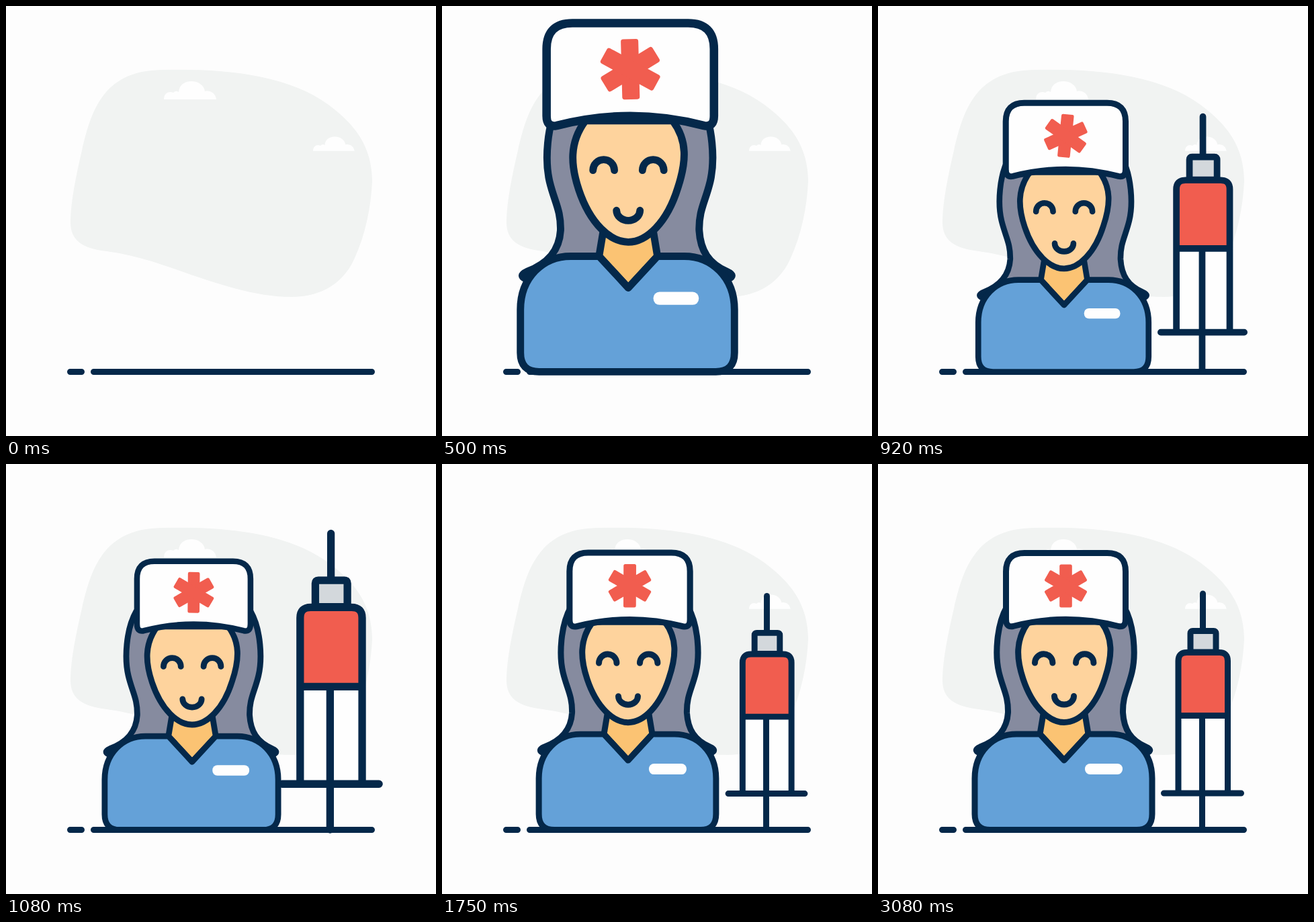
An HTML page for the animation above (3160 ms loop, 640 by 640 pixels).

```html
<!DOCTYPE html>
<html lang="en">
<head>
<meta charset="utf-8">
<title>Nurse and syringe</title>
<style>
  html, body { margin: 0; width: 100%; height: 100%; overflow: hidden; background: #fdfdfd; }
  svg { display: block; width: 100%; height: 100%; }
  .ink { stroke: #04284a; stroke-width: 9; stroke-linecap: round; stroke-linejoin: round; }
</style>
</head>
<body>
<svg viewBox="0 0 640 640">
  <defs>
    <path id="cloud" d="M0 27C0 17 8 14 14 17Q18 13 22 16C23 5 31 0 41 0C51 0 60 6 61 15C69 13 77 18 78 27Z"/>
    <rect id="bar" x="-9.3" y="-32" width="18.6" height="64" rx="2.5"/>
  </defs>

  <path fill="#f1f3f2" d="M96 322C96 290 106 245 113 215C128 150 148 95 235 95C330 93 420 103 480 147C525 180 545 215 545 262C543 300 535 340 519 375C503 412 470 433 425 433C370 433 310 412 250 391C215 379 190 371 150 365C115 361 96 350 96 322Z"/>
  <g fill="#fefefe">
    <use href="#cloud" x="235" y="112"/>
    <use href="#cloud" transform="translate(457 194.5) scale(.79)"/>
  </g>
  <path class="ink" fill="none" d="M95.5 544.5H112.5M130.5 544.5H544.5"/>

  <g id="syringe" class="ink" fill="none">
    <path d="M483.5 193V246"/>
    <path fill="#d3d8dc" d="M465 280V252Q465 248.5 468.5 248.5H499.5Q503 248.5 503 252V280Z"/>
    <path fill="#fefefe" stroke="none" d="M447 374H520.5V490H447Z"/>
    <path fill="#f15d4f" stroke="none" d="M447 374.5V293Q447 280.5 459.5 280.5H508Q520.5 280.5 520.5 293V374.5Z"/>
    <path d="M447 490V293Q447 280.5 459.5 280.5H508Q520.5 280.5 520.5 293V490M447 374.5H520.5M482.5 374.5V544M425.5 490H540.5"/>
  </g>

  <g id="nurse" class="ink" fill="none">
    <path fill="#868b9f" d="M192 212C176 240 174 285 180 310C186 335 194 345 193.5 370C192 395 178 411 152 421Q141 426 151 430L277 440L400 430Q410 426 399 421C376 411 366 395 364.5 370C364 345 372 335 378 310C384 285 382 240 366 212Z"/>
    <path fill="#fbc373" d="M246 372L241 402L277 441L313 402L308 372Z"/>
    <path fill="#fed39d" d="M224 235C204 262 206 290 216 320C230 362 255 384.5 277 384.5C300 384.5 325 360 338 318C349 285 350 259 332 235Z"/>
    <path d="M233.5 296a13.2 13.2 0 0 1 26.4 0M294.5 296a13.2 13.2 0 0 1 26.4 0M262.5 345.5a14.5 12.5 0 0 0 29 0"/>
    <path fill="#64a1d8" d="M241 402H206C172 402 144 428 144 468V521Q144 544.5 167 544.5H385Q408 544.5 408 521V468C408 428 380 402 346 402H313L277 441Z"/>
    <rect x="308" y="446" width="56" height="16" rx="7.5" fill="#fefefe" stroke="none"/>
    <g id="hat">
      <path fill="#fefefe" d="M190.5 160Q190.5 132.5 218 132.5H341Q368.5 132.5 368.5 160V231Q368.5 243.5 358 241.5Q279.5 221 201 241.5Q190.5 243.5 190.5 231Z"/>
      <g id="cross" fill="#f15d4f" stroke="none">
        <use href="#bar"/>
        <use href="#bar" transform="rotate(60)"/>
        <use href="#bar" transform="rotate(120)"/>
      </g>
    </g>
  </g>
</svg>
<script>
const LOOP = 3160;
const part = id => document.getElementById(id);

// Elastic ease-out from 0 to 1
function elastic(ms, start, length, period) {
  const t = (ms - start) / length;
  if (t <= 0) return 0;
  if (t >= 1) return 1;
  return 1 - 2 ** (-10 * t) * Math.cos(2 * Math.PI * t / period);
}

const scaleAt = (x, y, s) =>
  `translate(${x} ${y}) scale(${s}) translate(${-x} ${-y})`;

const pops = [
  { el: part('nurse'), x: 276, y: 545, tween: [78, 1900, 0.485] },
  { el: part('hat'), x: 279.5, y: 245, tween: [117, 2500, 0.47] },
  { el: part('syringe'), x: 483, y: 544, tween: [669, 2150, 0.42] }
];
const cross = part('cross');

function draw(ms) {
  for (const { el, x, y, tween } of pops) {
    const s = elastic(ms, ...tween);
    el.style.visibility = s > 0 ? 'visible' : 'hidden';
    el.setAttribute('transform', scaleAt(x, y, Math.max(s, 0.001)));
  }
  const turn = 48 * (elastic(ms, 220, 2500, 0.47) - 1);
  cross.setAttribute('transform', `translate(279.5 181.5) rotate(${turn})`);
}

const begin = performance.now();
function tick() {
  draw((performance.now() - begin) % LOOP);
  requestAnimationFrame(tick);
}
draw(0);
requestAnimationFrame(tick);
</script>
</body>
</html>
```
